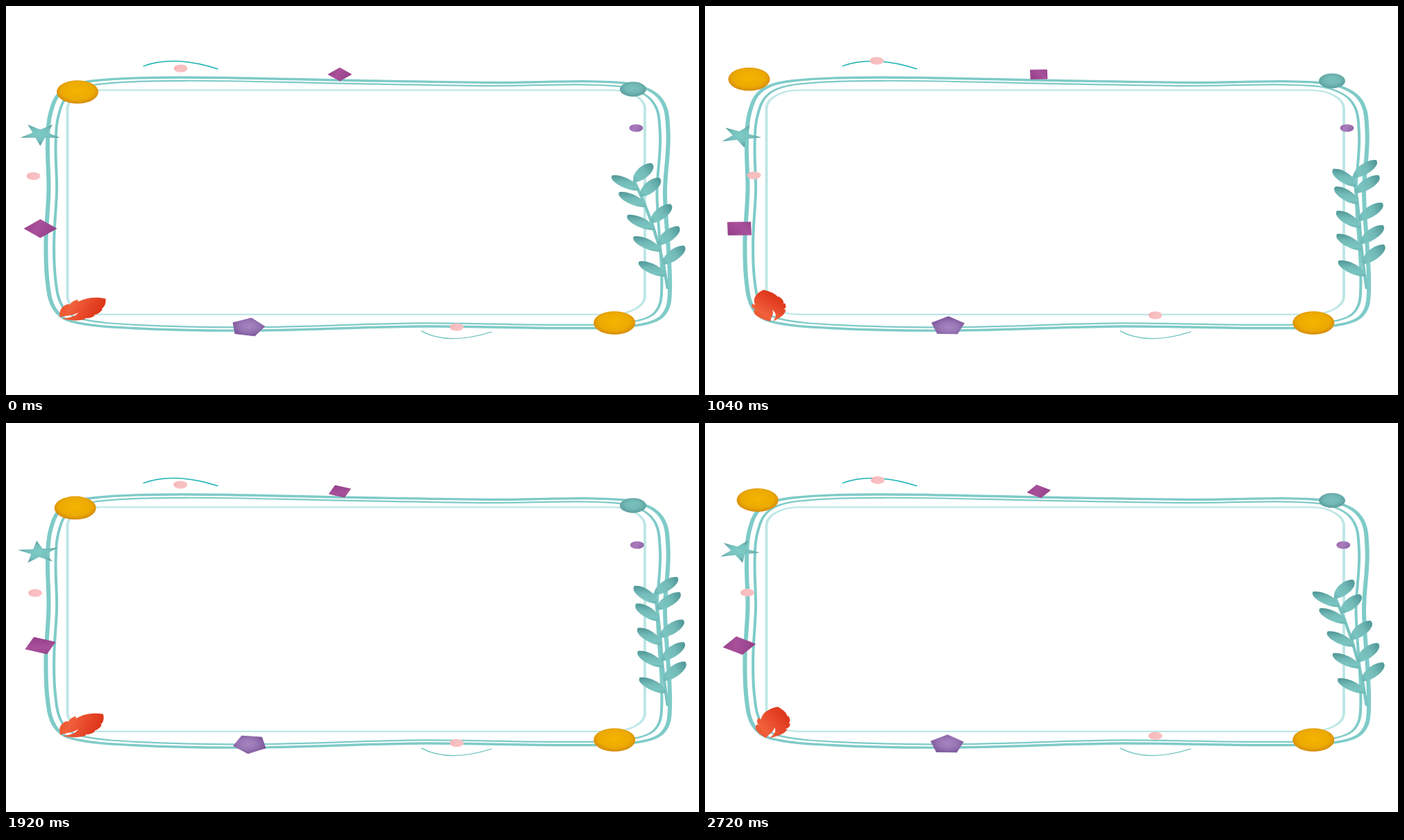
An HTML page that plays this animation: 998x561 px, repeating every 2.8 s.

```html
<!DOCTYPE html>
<html lang="en">
<head>
<meta charset="utf-8">
<title>Sea frame</title>
<style>
html, body { margin: 0; width: 100%; height: 100%; overflow: hidden; background: #fff; }
svg { display: block; width: 100vw; height: 100vh; }
</style>
</head>
<body>
<svg id="stage" viewBox="0 0 998 561" preserveAspectRatio="none"></svg>
<script>
const LOOP = 2800, STEP = 80;
// The artwork is a square sheet squeezed vertically by K, so turns happen before the squeeze.
const K = 561 / 998;
const up = y => +(y / K).toFixed(2);
const svg = document.getElementById('stage');

// Gradients take evenly spread colours.
const stops = colors => colors.map((c, i) =>
  `<stop offset="${i / (colors.length - 1)}" stop-color="${c}"/>`).join('');
const radial = (id, ...colors) =>
  `<radialGradient id="${id}" cx=".5" cy=".45" r=".58">${stops(colors)}</radialGradient>`;
const linear = (id, ...colors) =>
  `<linearGradient id="${id}" y2=".3">${stops(colors)}</linearGradient>`;

const defs = `<defs>
${radial('gold', '#f4b500', '#f0af00', '#ecaa02', '#cf820c')}
${radial('pebble', '#7ac0bd', '#72b8b5', '#579a9a')}
${radial('starFill', '#7ecbc7', '#76c0bd', '#528f92')}
${radial('lilac', '#a585c0', '#9876b4', '#7d569a')}
${linear('plum', '#96428a', '#a8509a', '#96428a')}
${linear('violet', '#9d62a8', '#a97dbc', '#9168ab')}
${linear('rose', '#f5b3b6', '#f9bfc0', '#f8c0c2')}
${linear('flame', '#e8502c', '#f0603a', '#e7482a', '#dc3418')}
${linear('frond', '#62aba9', '#7ac5c1', '#72bab7', '#549b9b')}
</defs>`;

// Smooth closed curve through points.
function smooth(p) {
  const n = p.length, at = i => p[(i + n) % n];
  const tangent = (i, len) => {
    const [a, c] = [at(i - 1), at(i + 1)];
    const k = len / 3 / Math.hypot(c[0] - a[0], c[1] - a[1]);
    return [(c[0] - a[0]) * k, (c[1] - a[1]) * k];
  };
  return `M${p[0]}` + p.map((b, i) => {
    const c = at(i + 1), len = Math.hypot(c[0] - b[0], c[1] - b[1]);
    const u = tangent(i, len), v = tangent(i + 1, len);
    return 'C' + [b[0] + u[0], b[1] + u[1], c[0] - v[0], c[1] - v[1], ...c]
      .map(q => q.toFixed(1)).join(' ');
  }).join('') + 'Z';
}

const rim = [
  [60, 200], [61.5, 265], [57.5, 340], [60, 400], [70, 437], [95, 455], [180, 464.5],
  [350, 468], [600, 462], [800, 464.5], [900, 461.5], [944, 448], [956, 410], [949, 270],
  [953.5, 180], [940, 131], [890, 111], [700, 110.5], [480, 107], [250, 103], [125, 108],
  [82, 121.5], [64, 155]];
// The rim shrunk about the middle of the frame.
const ring = s => smooth(rim.map(([x, y]) => [506 + (x - 506) * s, up(286 + (y - 286) * s)]));

const line = (d, color, w) =>
  `<path d="${d}" fill="none" stroke="${color}" stroke-width="${w}" stroke-linecap="round"/>`;
const arc = (x, y, x2, y2, rise, color, w) => line(
  `M${x} ${up(y)}C${x + (x2 - x) * .25} ${up(y + rise)} ${x + (x2 - x) * .6} ${up(y + rise)} ${x2} ${up(y2)}`, color, w);
const oval = (id, fill, r, x = 0, y = 0) =>
  `<circle id="${id}" r="${r}" cx="${x}" cy="${up(y)}" fill="url(#${fill})"/>`;

// Regular polygon, or a star when a second radius is given.
function poly(n, r, turn, dx = 0, dy = 0, r2) {
  const m = r2 ? n * 2 : n, pts = [];
  for (let i = 0; i < m; i++) {
    const a = (turn + i * 360 / m) * Math.PI / 180, s = r2 && i % 2 ? r2 : r;
    pts.push((dx + s * Math.cos(a)).toFixed(2) + ',' + (dy + s * Math.sin(a)).toFixed(2));
  }
  return pts.join(' ');
}
const shape = (id, fill, pts) =>
  `<polygon id="${id}" points="${pts}" fill="url(#${fill})" stroke="url(#${fill})" stroke-width="1.6" stroke-linejoin="round"/>`;

// Branch: a chain of joints, each carrying a left and a right leaf.
const bends = [1, 5, 5, 1.6, 1.4];
const leftY = [390, 354, 323, 290, 266], rightY = [373, 345, 313, 275, 254];
const stemX = y => 951 - .16 * (395 - y) - .00115 * (395 - y) ** 2;
const jointY = i => 407 - 31 * i;

function leaf(y, dx, dy) {
  const l = Math.hypot(dx, dy / K), a = Math.atan2(dy / K, dx) * 180 / Math.PI;
  const c1 = l * .14, c2 = l * .88;
  return `<path transform="translate(${stemX(y)} ${up(y)}) rotate(${a})" fill="url(#frond)"
    d="M0 0C${c1} -13 ${c2} -15 ${l} 0C${c2} 15 ${c1} 13 0 0Z"/>`;
}
function branch(i) {
  if (i === bends.length) return '';
  const [a, b] = [jointY(i), jointY(i + 1)];
  return `<g id="bend${i}">
    ${line(`M${stemX(a)} ${up(a)}L${stemX(b)} ${up(b)}`, '#7ac5c2', 4.5)}${branch(i + 1)}
    ${leaf(leftY[i], -38.5, -21.5)}${leaf(rightY[i], 29.5 - 1.4 * i, -27.5)}</g>`;
}

const feather = `M143.5 422C131 419 116 420 103.5 426.5L104 423.5C98 424.5 94 427 91.5 431.5
L91.5 429.5C83 430.5 75.5 437 77.5 449C88 446 96 447 104.5 442C99 449 90 449.5 80 451
C92 453 102 455 114.5 451.5L113 450C119 451 124 449 128 446.5
L126.5 445.5C131 445 136 442 139 437.5L137.5 437C143 433 144 428 143.5 422Z`;

svg.innerHTML = `${defs}<g transform="scale(1 ${K})">
<rect x="88.5" y="${up(121.5)}" width="831.5" height="${up(323.3)}" rx="47" fill="none" stroke="#bfe7e6" stroke-width="4"/>
${line(ring(1), '#7ecbc8', 6)}
${line(ring(.974), '#7ecbc8', 4)}
${arc(198.5, 86.5, 304.5, 90.7, -10, '#1fb3b3', 2.5)}
${arc(598.5, 469, 699, 470, 14, '#6cc3be', 2)}
${oval('goldA', 'gold', 30)}
${oval('goldB', 'gold', 30, 876.3, 457)}
${oval('teal', 'pebble', 19)}
${oval('dot', 'violet', 10)}
${oval('pinkA', 'rose', 10)}
${oval('pinkB', 'rose', 10)}
${oval('pinkC', 'rose', 10)}
${shape('gemA', 'plum', poly(4, 23, 0))}
${shape('gemB', 'plum', poly(4, 16.4, 0))}
${shape('penta', 'lilac', poly(5, 24.2, -5.8, -1.5, 1.4))}
<polygon id="star" points="${poly(5, 30.3, 18, 0, -2.7, 11.6)}" fill="url(#starFill)"/>
<g id="feather"><path transform="scale(1 ${1 / K})" d="${feather}" fill="url(#flame)"/></g>
<g id="branch">${branch(0)}</g>
</g>`;

const set = (id, v) => document.getElementById(id).setAttribute('transform', v);
const place = (id, x, y, a = 0) => set(id, `translate(${x} ${y / K}) rotate(${a})`);
const turn = (id, a, x, y) => set(id, `rotate(${a} ${x} ${y / K})`);

// Straight rise to 1 at the peak, straight fall to 0 at the end.
const swing = (t, peak, end) => t < peak ? t / peak : (end - t) / (end - peak);

function draw(t) {
  const p = swing(t % 2000, 1040, 2000);
  const b = swing(t, 1520, LOOP);
  const a = 360 * t / LOOP;

  place('goldA', 103 - 39.5 * p, 124 - 18.5 * p);
  place('teal', 903, 120 - 12 * p);
  place('dot', 907.5 + 17 * p, 176);
  place('pinkA', 39.5 + 31 * p, 245.3 - p);
  place('pinkB', 251.5 - 4 * p, 90 - 11 * p);
  place('pinkC', 649 - .5 * p, 463 - 17 * p);

  place('gemA', 49.5, 321, a);
  place('gemB', 480.7, 98.6, a);
  place('penta', 349.7, 462.6, a);
  place('star', 49.3, 186.2, a);

  turn('feather', -61 * p, 94.7, 443.8);

  // The branch straightens as it swings up, so it grows a little.
  const grow = 1 + .03 * b * (2 - b), foot = up(jointY(0));
  set('branch', `translate(0 ${foot}) scale(1 ${grow}) translate(0 ${-foot})`);
  bends.forEach((d, i) => turn('bend' + i, d * b, stemX(jointY(i)), jointY(i)));
}

const start = performance.now();
function frame() {
  const t = (performance.now() - start) % LOOP;
  draw(Math.floor(t / STEP) * STEP);
  requestAnimationFrame(frame);
}
frame();
</script>
</body>
</html>
```
